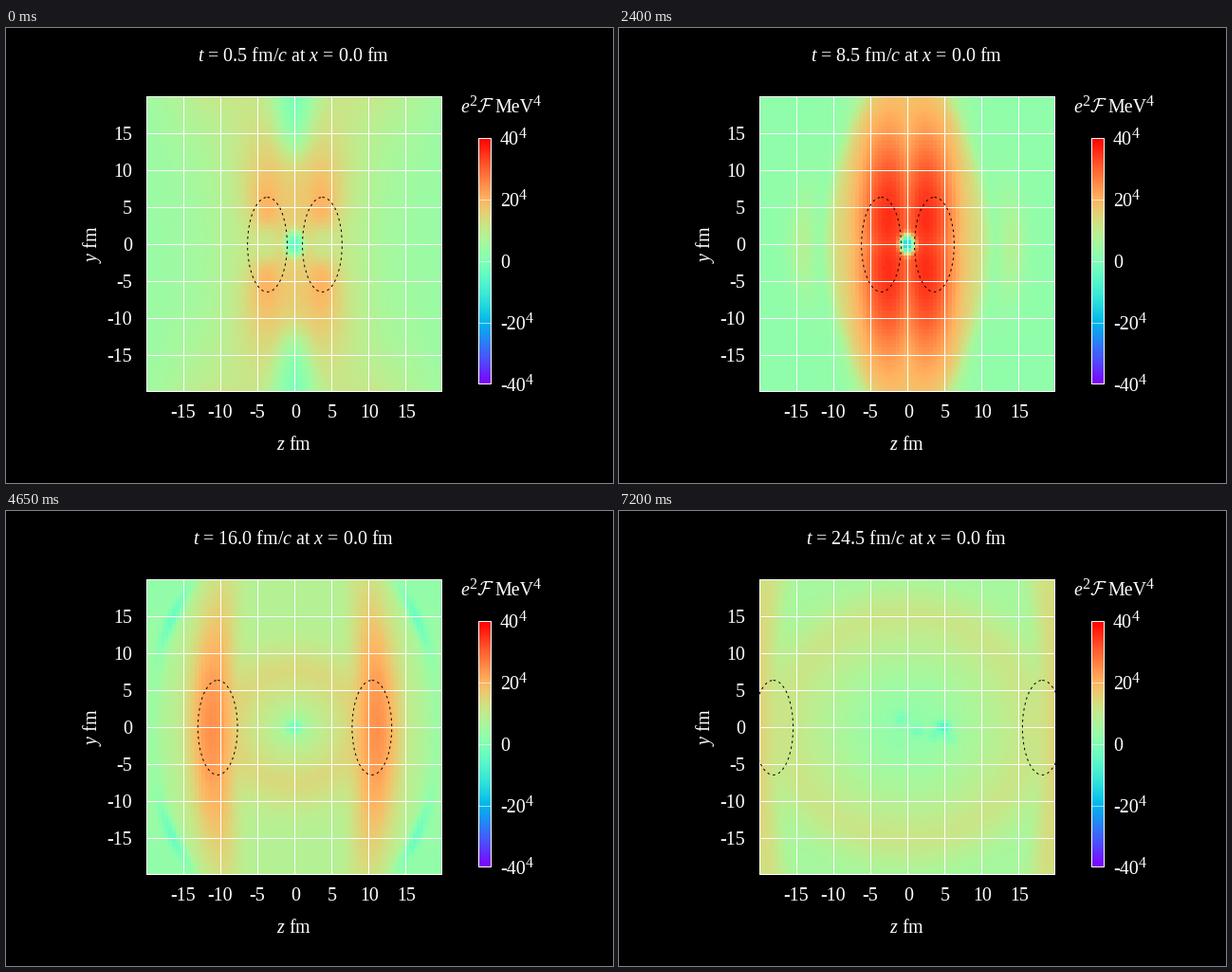
Animation, 640 px wide and 480 px high, one loop 7.35 s. Source, as a matplotlib script:

```python
import numpy as np
import matplotlib.pyplot as plt
from matplotlib.animation import FuncAnimation
from matplotlib.patches import Ellipse, Rectangle

plt.rcParams.update({
    "font.family": "Liberation Serif",
    "mathtext.fontset": "custom",
    "mathtext.rm": "Liberation Serif",
    "mathtext.it": "Liberation Serif:italic",
})

FRAMES, INTERVAL = 49, 150
LEFT, TOP, SIDE = 148, 72, 312
CX, CY, FM = 304, 228, 7.8          # plot centre and pixels per fm
PX = 0.9                            # points per pixel at 80 dpi
SPEED, T_MEET, GAMMA = 0.912, 4.57, 2.4

CELLS = 80
axis = (np.arange(CELLS) + 0.5) * 40 / CELLS - 20
Z, Y = np.meshgrid(axis, -axis)
A, B = np.abs(Z), np.abs(Y)
R = np.hypot(0.92 * Z, Y)
SPOTS = np.random.default_rng(4).uniform(-1, 1, (7, 2))


def gauss(d, w):
    return np.exp(-0.5 * (d / w) ** 2)


def ease(t, start, end):
    x = min(max((t - start) / (end - start), 0), 1)
    return x * x * (3 - 2 * x)


def offset(t):
    return SPEED * abs(t - T_MEET)


def nucleus(zc):
    """Boosted charge: flattened field with a dip in the middle."""
    r2 = (GAMMA * (Z - zc)) ** 2 + Y ** 2
    k = 125 + 88 * Y ** 2 / (r2 + 1)
    return k * np.sqrt(r2) / (r2 + 28), 11 * np.exp(-r2 / 20)


def front(t, split):
    """Central column that splits into two outgoing fronts."""
    pos = max(0, 1.15 * (t - 6.3)) - 0.005 * B ** 2 * ease(t, 11, 18)
    d = A - np.maximum(pos, 0)
    young = (4.4 - 0.03 * B) * (1 - np.exp(-(t + 0.5) / 1.2))
    width = young + split * (np.where(d < 0, 2.6, 3.0) - young)

    peak = 39 * ease(t, -1.5, 4) * np.exp(-max(t - 6, 0) / 20)
    mid = 5.5 * (1 - split)
    tall = np.where(B < mid, 8, 4.5 + 1.5 * t - 12 * split)
    return peak * gauss(B - mid, tall) * gauss(d, width)


def ring(t, edge):
    """Expanding ring, cut off at the curved outer edge."""
    r0 = max(0.5, 0.9 * (t - 8))
    top = (15.5 - 0.3 * (t - 11)) * ease(t, 2, 10)
    low = min(top, 5 + 8.5 * np.exp(-(t - 11) / 5))
    inner = top * np.minimum(R / r0, 1) ** np.clip(0.05 * t - 0.3, 0.3, 1)
    outer = low + (top - low) * np.exp(-((R - r0) / 4) ** 2)
    gate = 1 / (1 + np.exp(np.clip((A - edge + 0.013 * B ** 2) / 0.6, -40, 40)))
    return np.where(R < r0, inner, outer) * gate


def field(t):
    early = 1 - ease(t, 1.5, 6.5)
    split = ease(t, 6.5, 11)
    edge = 1.07 * t + 1.75

    wing = 7 * early * (B / 20) ** 2 * gauss(A - 11 + 1.5 * t, 6)
    plume = 21 * ease(t, 6, 11) * (1 - ease(t, 11, 16))
    terms = [early * p for s in (-1, 1) for p in nucleus(s * offset(t))]
    terms += [2.8 + wing, front(t, split), ring(t, edge),
              plume * gauss(B - 22 - 1.2 * (t - 11), 4) * gauss(Z, 3)]
    s = sum(p ** 3 for p in terms) ** (1 / 3)

    # notch above and below, closing outwards
    reach = np.maximum(B - 9 - 2.5 * (t - 0.5), 0)
    s *= 1 - gauss(Z, 0.11 * B) * (1 - np.exp(-(reach / 5) ** 2))

    # outer lens, early dip, dark streaks
    lens = 5.5 * ease(t, 4, 6.5) * (1 - ease(t, 16, 20))
    s += lens * gauss(A - 12.2 - 0.98 * (t - 6.5) + 0.012 * B ** 2, 1.25) \
        * gauss(B, 4.5 + 0.35 * max(t - 6.5, 0))
    s -= 4.5 * gauss(t - 2.5, 1.2) * gauss(A - 6 - t, 1.2) * gauss(B, 3.5)
    streak = 7 * ease(t, 8, 14) * (1 - ease(t, 21, 24))
    s -= streak * gauss(A - edge - 1 + 0.016 * B ** 2, 0.6) \
        * gauss(B - 11 - 0.8 * (t - 11), 3)

    # hole in the middle
    q = (Z / (1 + 1.4 * gauss(t - 2.8, 1.3))) ** 2
    q = q + (Y / (1.7 - 0.9 * split)) ** 2
    h = np.exp(-q ** 1.5) * (1 - ease(t, 16, 20))
    s += (-2 - 20 * ease(t, 0, 2.5) * (1 - split) - s) * h

    # drifting late spots
    depth = 4.5 * ease(t, 16, 20)
    spread = 0.8 * max(t - 17, 0)
    for pz, py in SPOTS:
        s -= depth * gauss(np.hypot(Z - spread * pz, Y - 1.9 * py), 0.6)
    return s


fig = plt.figure(figsize=(8, 6), dpi=80, facecolor="black")
ax = fig.add_axes([0, 0, 1, 1])
ax.axis("off")


def write(x, y, s, size=20, **kw):
    kw.setdefault("va", "baseline")
    return ax.text(x, y, s, color="white", fontsize=size * PX, **kw)


def line(x, y, alpha=1.0):
    ax.plot(x, y, color="white", lw=PX, alpha=alpha, zorder=3,
            solid_capstyle="butt", snap=False)


def box(x, y, w, h):
    ax.add_patch(Rectangle((x + .5, y + .5), w, h, fill=False,
                           ec="white", lw=PX, zorder=4, snap=False))


def shade(data, extent):
    return ax.imshow(data, extent=extent, cmap="rainbow", vmin=-40, vmax=40,
                     aspect="auto", interpolation="nearest")


heat = shade(field(0.5), (LEFT, LEFT + SIDE, TOP + SIDE, TOP))
shade(np.linspace(40, -40, 256)[:, None], (498, 512, 376, 116))
ax.set_xlim(0, 640)
ax.set_ylim(480, 0)

# grid and tick labels
for v in range(-15, 16, 5):
    x, y = CX + v * FM, CY - v * FM
    line([x + .5] * 2, [TOP, TOP + SIDE])
    line([LEFT, LEFT + SIDE], [y + .5] * 2)
    write(x + (v >= 0), 411, str(v), ha="center")
    write(133, y + 7, str(v), ha="right")
box(LEFT, TOP, SIDE - 1, SIDE - 1)

# colour bar
box(498, 116, 13, 259)
for v in range(-40, 41, 20):
    y = 246 - v * 3.25
    if abs(v) < 40:
        line([498, 512], [y + .5] * 2, .6)
    write(521, y + 7, str(v))
    if v:
        write(541 if v > 0 else 547.7, y, "4", 16)

write(479, 89, "e", style="italic")
write(488, 82, "2", 16)
write(496, 89, r"$\mathcal{F}$", math_fontfamily="cm")
write(515, 89, "MeV")
write(556, 82, "4", 16)

write(303, 445, r"$\mathit{z}$ fm", ha="center")
write(96, 228, r"$\mathit{y}$ fm", ha="center", rotation=90,
      rotation_mode="anchor")
title = write(303.5, 35, "", ha="center")

clip = Rectangle((LEFT, TOP), SIDE, SIDE, transform=ax.transData)
rims = []
for _ in range(2):
    rim = Ellipse((CX, CY), 2 * 2.68 * FM, 2 * 6.4 * FM, fill=False,
                  ec="black", lw=PX, ls=(0, (2.5, 3.5)), zorder=5)
    ax.add_patch(rim)
    rim.set_clip_path(clip)
    rims.append(rim)


def draw(i):
    t = 0.5 * (i + 1)
    heat.set_data(field(t))
    title.set_text(rf"$\mathit{{t}}$ = {t:.1f} fm/$\mathit{{c}}$ at "
                   r"$\mathit{x}$ = 0.0 fm")
    for rim, side in zip(rims, (-1, 1)):
        rim.set_center((CX + .5 + side * offset(t) * FM, CY + .5))
    return [heat, title, *rims]


anim = FuncAnimation(fig, draw, frames=FRAMES, interval=INTERVAL,
                     repeat=True, repeat_delay=0, blit=False)
plt.show()
```
